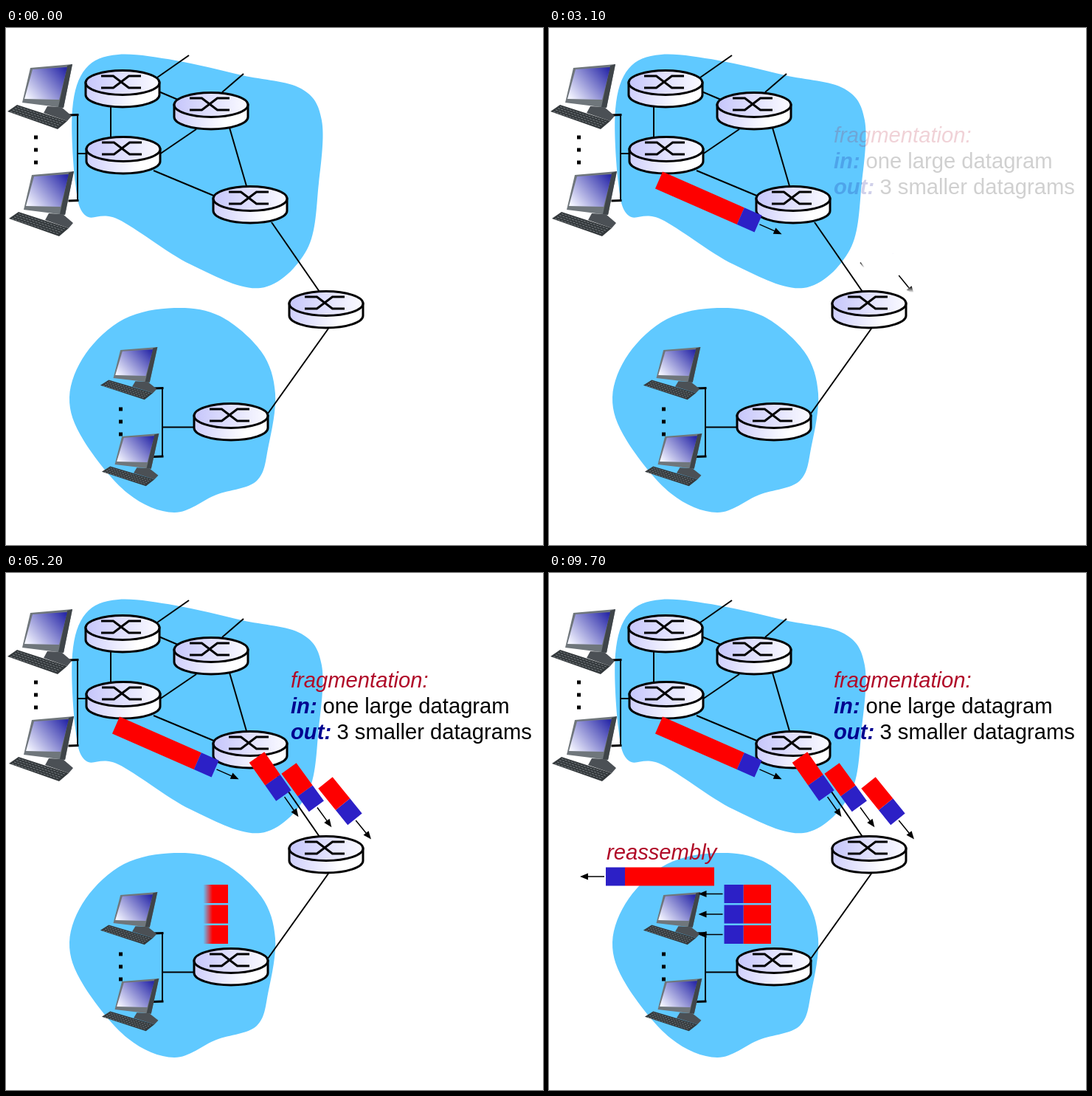
Animation, 728 px wide and 700 px high, one loop 10 s. Source, as an HTML page with a canvas:

```html
<!DOCTYPE html>
<html lang="en">
<head>
<meta charset="utf-8">
<title>Datagram fragmentation</title>
<style>
  html, body { margin: 0; width: 100%; height: 100%; overflow: hidden; background: #fff; }
  canvas { display: block; }
</style>
</head>
<body>
<canvas id="stage" width="728" height="700"></canvas>
<script>
const W = 728, H = 700, LOOP = 10000;
const RED = '#fe0000', BLUE = '#2c20c6', SKY = '#60c9ff', CRIMSON = '#b00a28', NAVY = '#00008f';
const FONT = '29.2px "Liberation Sans", Arial, sans-serif';

// Packets share one thickness and header; the arrow starts at the header's end
const THICK = 25, HEAD = 26, ARROW = 35;
const LONG = 147, SHORT = 63.5;

const view = document.getElementById('stage').getContext('2d');
const layer = () => {
  const c = document.createElement('canvas');
  c.width = W;
  c.height = H;
  return c.getContext('2d');
};
const scene = layer(), scratch = layer();
const progress = (t, start, dur) => Math.min(1, Math.max(0, (t - start) / dur));
const rad = deg => deg * Math.PI / 180;

function poly(c, fill, ...pts) {
  c.beginPath();
  for (let i = 0; i < pts.length; i += 2) c.lineTo(pts[i], pts[i + 1]);
  c.fillStyle = fill;
  c.fill();
}

function line(c, width, ...pts) {
  c.beginPath();
  for (let i = 0; i < pts.length; i += 2) c.lineTo(pts[i], pts[i + 1]);
  c.lineWidth = width;
  c.stroke();
}

function fade(c, x0, y0, x1, y1, from, to) {
  const g = c.createLinearGradient(x0, y0, x1, y1);
  g.addColorStop(0, from);
  g.addColorStop(1, to);
  return g;
}

// Closed smooth curve through a few points
function blob(c, ...pts) {
  const n = pts.length / 2;
  const at = i => [pts[(i + n) % n * 2], pts[(i + n) % n * 2 + 1]];
  c.beginPath();
  c.moveTo(...at(0));
  for (let i = 0; i < n; i++) {
    const a = at(i - 1), b = at(i), d = at(i + 1), e = at(i + 2);
    c.bezierCurveTo(b[0] + (d[0] - a[0]) / 6, b[1] + (d[1] - a[1]) / 6,
      d[0] - (e[0] - b[0]) / 6, d[1] - (e[1] - b[1]) / 6, d[0], d[1]);
  }
  c.fillStyle = SKY;
  c.fill();
}

function router(c, x, y) {
  const rx = 50, ry = 16.5, depth = 16.5;
  c.save();
  c.translate(x, y);
  c.lineWidth = 3;
  c.beginPath();
  c.ellipse(0, depth, rx, ry, 0, 0, Math.PI);
  c.lineTo(-rx, 0);
  c.lineTo(rx, 0);
  c.closePath();
  c.fillStyle = fade(c, -rx, 0, rx * 0.4, 0, '#cfcffc', '#ffffff');
  c.fill();
  c.stroke();
  c.beginPath();
  c.ellipse(0, 0, rx, ry, 0, 0, Math.PI * 2);
  c.fillStyle = fade(c, -rx, 0, rx, 0, '#c6c6fb', '#fbfbff');
  c.fill();
  c.stroke();
  c.translate(-2, -1);
  for (const h of [8, -8]) line(c, 3, -27, -h, -10.5, -h, 10.5, h, 27, h);
  c.restore();
}

function computer(c, x, y, sx = 1, sy = 1) {
  c.save();
  c.translate(x, y);
  c.scale(sx, sy);
  poly(c, '#4b5055', 55, 57, 74, 58, 88, 70, 82, 77, 50, 66);
  poly(c, '#6f767b', 32, 5, 89, 0, 77, 59, 21, 52);
  poly(c, '#3f4549', 82, 2, 89, 0, 77, 59, 70, 58);
  poly(c, fade(c, 28, 46, 78, 4, '#f3f4ff', '#2828a8'), 35, 7, 82, 4, 71, 48, 24, 47);
  poly(c, '#33383b', 14, 55, 82, 77, 69, 88, 1, 64);
  c.strokeStyle = '#8a9095';
  c.setLineDash([3, 1.5]);
  for (let i = 0; i < 4; i++) line(c, 0.8, 14 - i * 3, 57.5 + i * 2.2, 77 - i * 3, 78 + i * 2.2);
  c.restore();
}

function dots(c, x, y) {
  c.fillStyle = '#000';
  for (let i = 0; i < 3; i++) c.fillRect(x - 2, y - 2.5 + i * 17, 5, 5);
}

function bus(c, x, top, bottom, exitX, exitY) {
  line(c, 2, x, top, x, bottom);
  line(c, 2, x, exitY, exitX, exitY);
  for (const y of [top, bottom]) line(c, 3, x - 12.5, y + 0.5, x + 1.5, y);
}

function buildScene(c) {
  blob(c, 152, 36, 230, 44, 320, 64, 400, 82, 428, 125, 424, 210, 408, 300, 345, 352,
    250, 320, 152, 259, 108, 254, 94, 210, 90, 110, 108, 55);
  blob(c, 228, 379, 290, 390, 346, 438, 365, 495, 356, 565, 340, 613, 285, 632,
    228, 656, 165, 630, 105, 558, 86, 500, 108, 441, 160, 394);
  [
    [205, 67, 248, 37], [293, 87, 322, 62], [142, 105, 142, 149], [207, 86, 233, 97],
    [208, 171, 258, 137], [303, 135, 326, 214], [200, 193, 284, 228],
    [360, 263, 425, 357], [437, 407, 355, 522]
  ].forEach(p => line(c, 2, ...p));
  bus(c, 97, 117.5, 233.5, 110, 170);
  bus(c, 212, 487.5, 580, 256, 540.5);
  [[158, 74], [278, 104], [159, 164], [331, 231], [434, 373], [305, 525]].forEach(p => router(c, ...p));
  for (const i of [0, 1]) {
    computer(c, 1 + i * 2, 49 + i * 145);
    computer(c, 127 + i * 2, 432 + i * 117, 0.88, 0.81);
  }
  dots(c, 40, 148);
  dots(c, 155, 516);
}

// Draws in a frame that runs along the packet, tail at the origin
function along(c, p, draw) {
  c.save();
  c.translate(p.x, p.y);
  c.rotate(rad(p.angle));
  draw();
  c.restore();
}

const block = (p, from, to, color) => c => along(c, p, () => {
  c.fillStyle = color;
  c.fillRect(from, -THICK / 2, to - from, THICK);
});

const arrow = p => c => along(c, p, () => {
  const tip = p.len + ARROW;
  line(c, 1.5, p.len + 2, 0, tip - 10, 0);
  poly(c, '#000', tip, 0, tip - 11, -4.5, tip - 11, 4.5);
});

const packet = p => c => {
  block(p, 0, p.len - HEAD, RED)(c);
  block(p, p.len - HEAD, p.len, BLUE)(c);
  arrow(p)(c);
};

// Soft-edged reveal of a drawing from point a towards point b
function wipe(p, ax, ay, bx, by, soft, draw) {
  if (p <= 0) return;
  if (p >= 1) return draw(view);
  const s = scratch, lead = p * (1 + soft), solid = lead - soft;
  const dx = bx - ax, dy = by - ay;
  s.globalCompositeOperation = 'source-over';
  s.clearRect(0, 0, W, H);
  draw(s);
  s.globalCompositeOperation = 'destination-in';
  s.fillStyle = fade(s, ax + dx * solid, ay + dy * solid, ax + dx * lead, ay + dy * lead,
    'rgba(0,0,0,1)', 'rgba(0,0,0,0)');
  s.fillRect(0, 0, W, H);
  view.drawImage(s.canvas, 0, 0);
}

const whole = { x: 149, y: 206, angle: 23.7, len: LONG };
const joined = { x: 224, y: 411, angle: 180, len: LONG };
const fragments = [[433, 284, 51], [383.5, 264.5, 54], [340, 249.5, 55]]
  .map(([x, y, angle]) => ({ x, y, angle, len: SHORT }));
const arrivals = [0, 1, 2].map(i => ({ x: 301, y: 434.5 + i * 27.5, angle: 180, len: SHORT }));

// Arrow, header and body drop in one after another
function fragment(p, i, t) {
  const sin = Math.sin(rad(p.angle)), half = THICK / 2 * Math.cos(rad(p.angle));
  const neck = p.len - HEAD, tip = p.len + ARROW;
  const part = (k, from, to, pad, draw) =>
    wipe(progress(t, 2800 + 200 * i + 290 * k, 430),
      0, p.y + from * sin - pad, 0, p.y + to * sin + pad, 0.3, draw);
  part(0, p.len, tip, 0, arrow(p));
  part(1, neck, p.len, half, block(p, neck, p.len, BLUE));
  part(2, 0, neck, half, block(p, 0, neck, RED));
}

function text(str, x, y, color, style = '') {
  view.font = style + ' ' + FONT;
  view.fillStyle = color;
  view.fillText(str, x, y);
}

function render(t) {
  view.drawImage(scene.canvas, 0, 0);

  wipe(progress(t, 900, 1600), 144, 0, 319, 0, 0.125, packet(whole));
  fragments.forEach((p, i) => fragment(p, i, t));
  wipe(progress(t, 4780, 1420), 301, 0, 200, 0, 0.125, c => arrivals.forEach(p => packet(p)(c)));
  wipe(progress(t, 7230, 670), 224, 0, 40, 0, 0.125, packet(joined));

  view.globalAlpha = progress(t, 3000, 550);
  text('fragmentation:', 386, 155, CRIMSON, 'italic');
  text('in:', 386, 190, NAVY, 'italic bold');
  text('one large datagram', 429.5, 190, '#000');
  text('out:', 386, 225, NAVY, 'italic bold');
  text('3 smaller datagrams', 448.5, 225, '#000');
  view.globalAlpha = progress(t, 7230, 500);
  text('reassembly', 78, 388, CRIMSON, 'italic');
  view.globalAlpha = 1;
}

scene.fillStyle = '#fff';
scene.fillRect(0, 0, W, H);
buildScene(scene);

const begin = performance.now();
function tick() {
  render((performance.now() - begin) % LOOP);
  requestAnimationFrame(tick);
}
tick();
</script>
</body>
</html>
```
